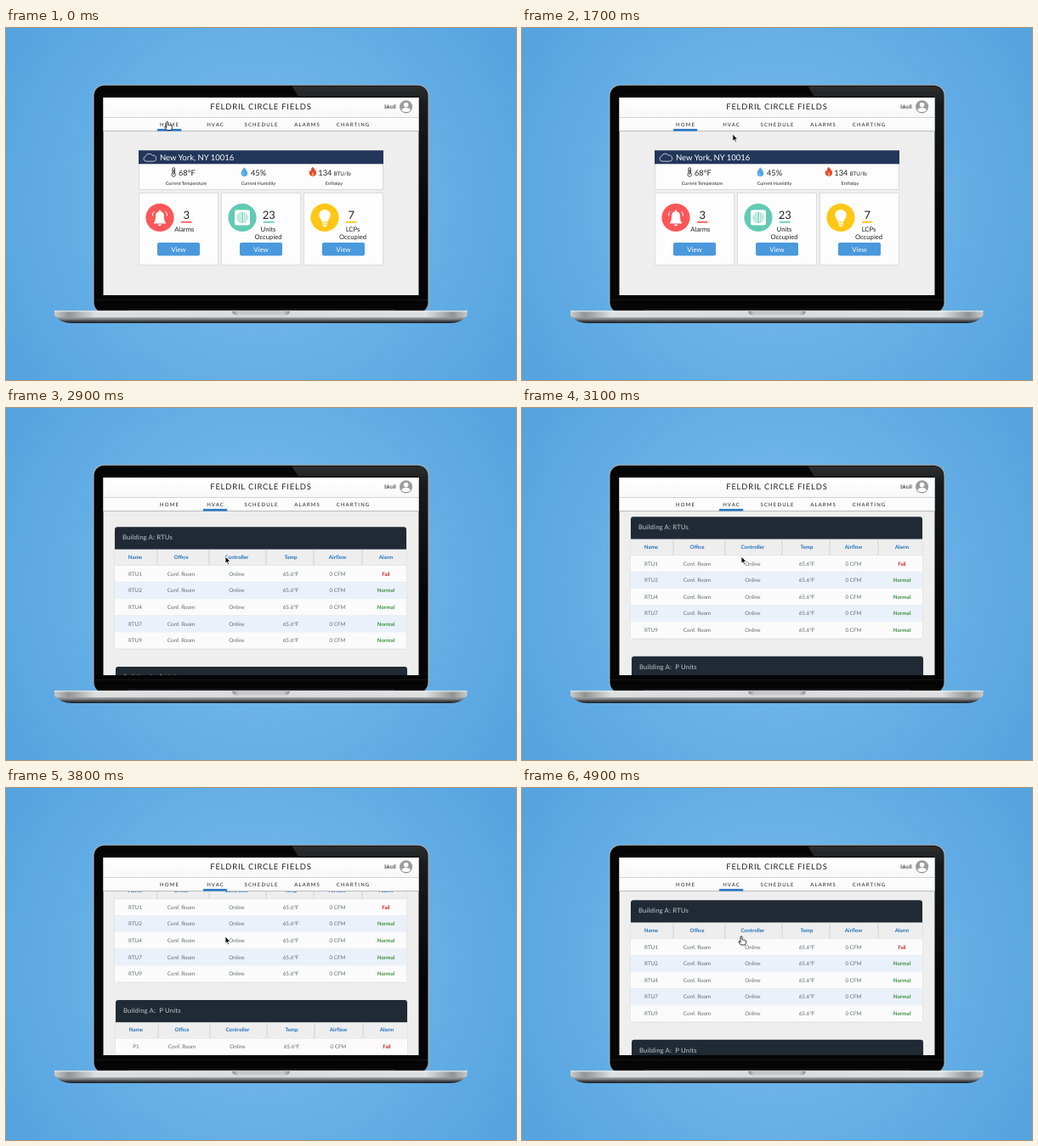
Write an HTML page that moves like this. It is 600 px wide and 415 px high and loops after 5 s.

```html
<!DOCTYPE html>
<html lang="en">
<head>
<meta charset="utf-8">
<title>Building dashboard</title>
<style>
  html, body { margin: 0; width: 100%; height: 100%; overflow: hidden; background: #5ba8e2; }
  svg { display: block; width: 600px; height: 415px; font-family: Lato, "Open Sans", sans-serif; text-rendering: geometricPrecision; }
</style>
</head>
<body>
<svg id="stage" viewBox="0 0 600 415" xmlns="http://www.w3.org/2000/svg">
  <defs>
    <radialGradient id="sky" gradientUnits="userSpaceOnUse" cx="300" cy="207" r="350">
      <stop offset="0" stop-color="#78bdee"/>
      <stop offset=".55" stop-color="#67b0e7"/>
      <stop offset="1" stop-color="#55a3df"/>
    </radialGradient>
    <linearGradient id="bar" x2="0" y2="1">
      <stop offset="0" stop-color="#fff"/>
      <stop offset="1" stop-color="#f8f8f8"/>
    </linearGradient>
    <linearGradient id="metal">
      <stop offset="0" stop-color="#c9cacc"/>
      <stop offset=".035" stop-color="#929395"/>
      <stop offset=".1" stop-color="#dedfe1"/>
      <stop offset=".5" stop-color="#d9dadc"/>
      <stop offset=".9" stop-color="#dedfe1"/>
      <stop offset=".965" stop-color="#929395"/>
      <stop offset="1" stop-color="#c9cacc"/>
    </linearGradient>
    <linearGradient id="under" x2="0" y2="1">
      <stop offset="0" stop-color="#a3a4a7"/>
      <stop offset=".35" stop-color="#85878a"/>
      <stop offset=".7" stop-color="#3c3e42"/>
      <stop offset="1" stop-color="#1d2024"/>
    </linearGradient>
    <linearGradient id="notch">
      <stop offset="0" stop-color="#8b8c8e"/>
      <stop offset=".1" stop-color="#c6c7c9"/>
      <stop offset=".9" stop-color="#c6c7c9"/>
      <stop offset="1" stop-color="#8b8c8e"/>
    </linearGradient>
    <linearGradient id="sheen" x2="0" y2="1">
      <stop offset="0" stop-color="#2d2e30"/>
      <stop offset=".08" stop-color="#1a1b1c"/>
      <stop offset=".6" stop-color="#050505"/>
    </linearGradient>
    <clipPath id="lid"><rect x="104" y="68.4" width="392" height="265" rx="11"/></clipPath>
    <clipPath id="view"><rect x="114.5" y="122" width="371" height="193"/></clipPath>
  </defs>

  <rect width="600" height="415" fill="url(#sky)"/>

  <!-- Laptop lid -->
  <rect x="102.4" y="66.7" width="395.2" height="269" rx="13" fill="#b0b2b5"/>
  <rect x="103.5" y="67.8" width="393" height="268" rx="12" fill="#050505"/>
  <path clip-path="url(#lid)" d="M336 68H497V334H485V81H344Z" fill="url(#sheen)"/>
  <rect x="104" y="320" width="392" height=".8" fill="#1c1c1e"/>
  <rect x="143" y="331.4" width="314" height="2.2" fill="#202023"/>

  <rect x="114.5" y="82" width="371" height="233" fill="#eee"/>
  <g clip-path="url(#view)">
    <g id="home"></g>
    <g id="hvac"></g>
  </g>

  <!-- Header and navigation -->
  <rect x="114.5" y="82" width="371" height="23.5" fill="url(#bar)"/>
  <rect x="114.5" y="105" width="371" height="1" fill="#d2d2d2"/>
  <rect x="114.5" y="106" width="371" height="15.5" fill="#fcfcfc"/>
  <rect x="114.5" y="121" width="371" height="1" fill="#bcbcbc"/>
  <g id="header"></g>
  <rect id="tab" y="118.9" width="28.2" height="2.6" fill="#2b78c5"/>
  <circle cx="470.6" cy="92.8" r="7.6" fill="#9b9b9b"/>
  <circle cx="470.6" cy="90.6" r="2.8" fill="#fff"/>
  <path d="M465.3 97.4Q465.8 94 470.6 94T475.9 97.4Q470.6 100.8 465.3 97.4Z" fill="#fff"/>

  <!-- Laptop base -->
  <path d="M59 340.5H540.5Q535 348 523 348H77Q65 348 59 340.5Z" fill="url(#under)"/>
  <path d="M57 333.6H542.5V338.5Q542 341.3 538 341.3H62Q57.4 341.3 57 338.5Z" fill="url(#metal)"/>
  <rect x="57" y="333.4" width="485.5" height="1" fill="#f4f5f6"/>
  <path d="M266.3 334H333.7V335Q333 338.6 328 338.6H272Q267 338.6 266.3 335Z" fill="url(#notch)"/>

  <g id="cursor">
    <path id="arrow" d="M0 0V8.3L1.9 6.6 3.2 9.6 4.6 9 3.3 6.1H5.9Z" fill="#0a0a0a" stroke="#fff" stroke-width=".8"/>
    <path id="hand" d="M-1 1Q-1-.3 0-.3T1 1V4L2 3.8 2.6 4.3 3.7 4.1 4.2 4.7 5.2 4.7 5.6 5.6V7.4L4.6 10H-.5L-2.8 7Q-3.5 5.8-2.6 5.6T-1 7Z" fill="#fff" stroke="#111" stroke-width=".85" stroke-linejoin="round"/>
  </g>
</svg>

<script>
const $ = id => document.getElementById(id);
const LOOP = 5000, STEP = 100;
const SWITCH = 1800;   // page change

const attrs = o => Object.entries(o).map(([k, v]) => `${k}="${v}"`).join(' ');
const rect = (x, y, width, height, fill, extra = {}) =>
  `<rect ${attrs({ x, y, width, height, fill, ...extra })}/>`;
const path = (d, extra) => `<path ${attrs({ d, ...extra })}/>`;
const text = (s, x, y, size, fill, extra = {}) =>
  `<text ${attrs({ x, y, 'font-size': size, fill, ...extra })}>${s}</text>`;
const mid = (s, x, y, size, fill, extra = {}) =>
  text(s, x, y, size, fill, { 'text-anchor': 'middle', ...extra });
const spaced = (s, x, y, size, gap) =>
  mid(s, x + gap / 2, y, size, '#222', { 'letter-spacing': gap });

function header() {
  const tabs = ['HOME', 'HVAC', 'SCHEDULE', 'ALARMS', 'CHARTING'];
  return spaced('FELDRIL CIRCLE FIELDS', 299.5, 96.2, 9.4, .82) +
    mid('bkoll', 452, 94.9, 6.5, '#222') +
    tabs.map((s, i) => spaced(s, 192 + 54 * i, 115.6, 6, 1.15)).join('');
}

const white = { fill: '#fff' };
const icons = {
  bell: path('M174 229.5Q176 228 176 222Q176 217 180 216.2V215Q181 214 182 215V216.2Q186 217 186 222Q186 228 188 229.5V230.5H174Z', white) +
    path('M179 231.5H183Q182.8 233.4 181 233.4T179 231.5Z', white) +
    path('M174.5 216Q172.5 218 172.3 221.5M187.5 216Q189.5 218 189.7 221.5', { fill: 'none', stroke: '#fff', 'stroke-width': 1 }),
  vent: rect(269, 214.5, 18, 18, '#fff', { rx: 2.5 }) +
    '<circle cx="278" cy="223.5" r="6.6" fill="#a9e2d6"/>' +
    path('M274 219V228M276.6 217.5V229.5M279.4 217.5V229.5M282 219V228', { stroke: '#fff', 'stroke-width': .8 }) +
    path('M278 217V230', { stroke: '#62cab4', 'stroke-width': .8 }),
  bulb: path('M371.5 228.5Q371.4 226.7 369.8 224.8A6.7 6.7 0 1 1 380.2 224.8Q378.6 226.7 378.5 228.5Z', white) +
    path('M371.8 230.1H378.2M372.1 232H377.9M373.4 233.7H376.6', { stroke: '#fff', 'stroke-width': 1.2 })
};

function card(i, color, count, lines, icon) {
  const x = 156.5 + 97 * i, c = 181 + 97 * i;
  const labelX = [209.8, 308.5, 408][i], countX = c + 31.3;
  return rect(x, 194.5, 93, 85, '#fdfdfd', { stroke: '#dadada', 'stroke-width': .9 }) +
    `<circle cx="${c}" cy="223.5" r="16.6" fill="${color}"/>` + icon +
    mid(count, countX, 225.3, 13, '#222') +
    rect(c + 25, 228, 12.5, 1.7, color) +
    lines.map((s, n) => mid(s, labelX, 239.8 + 8.8 * n, 7.7, '#222')).join('') +
    rect(c - 3, 253, 50, 15.6, '#4a99dc', { rx: 2 }) +
    mid('View', c + 22, 263.8, 7.8, '#fff');
}

function home() {
  const thermo = path('M195.9 171V166Q195.9 164.6 197.2 164.6T198.5 166V171A2.3 2.3 0 1 1 195.9 171Z', { fill: '#fff', stroke: '#333', 'stroke-width': .9 }) +
    path('M197.2 167V173', { stroke: '#333', 'stroke-width': 1 });
  const drop = path('M280.3 164.3Q284.2 169 284.2 171.2A3.7 3.7 0 0 1 276.6 171.2Q276.6 169 280.3 164.3Z', { fill: '#50a9e4' }) +
    path('M278.2 171Q278.4 173 280.3 173.2', { fill: 'none', stroke: '#b9def6', 'stroke-width': .7 });
  const flame = path('M360.5 163.8Q364 166.3 363.5 168.5L364.5 167.6Q366.4 174.6 361 174.8Q355.4 174.5 357.1 168L358.6 169Q358.6 166 360.5 163.8Z', { fill: '#e5472f' }) +
    path('M361 169.3Q363.4 173.8 361 174.2Q358.5 173.8 361 169.3Z', { fill: '#ffa63d' });
  const cloud = path('M164.5 157.2A3.1 3.1 0 0 1 164.2 151.2A4.5 4.5 0 0 1 172.2 150.2A3.5 3.5 0 0 1 173.8 157.2Z', { fill: 'none', stroke: '#e6ebf2', 'stroke-width': .8 });
  const notes = [['Current Temperature', 212], ['Current Humidity', 297], ['Enthalpy', 386]];
  return rect(156.5, 144.5, 287, 46, '#fdfdfd', { stroke: '#d8d8d8', 'stroke-width': .9 }) +
    rect(156, 144.3, 288, 16, '#22365a') + cloud +
    text('New York, NY 10016', 181, 155.8, 9.5, '#fff') +
    thermo + drop + flame +
    text('68°F', 203, 173.8, 9.2, '#222') +
    text('45%', 288, 173.8, 9.2, '#222') +
    text('134', 367.3, 173.8, 9.2, '#222') +
    text('BTU/lb', 385.6, 173.8, 6.3, '#222') +
    notes.map(([s, x]) => mid(s, x, 185, 5.3, '#222')).join('') +
    card(0, '#fb5759', '3', ['Alarms'], icons.bell) +
    card(1, '#62cab4', '23', ['Units', 'Occupied'], icons.vent) +
    card(2, '#fec715', '7', ['LCPs', 'Occupied'], icons.bulb);
}

const columns = [152, 206, 271.5, 335, 390, 447];
const dividers = [178, 239, 306, 362, 419];
const ROW = 19.6;

function table(title, prefix, x, y) {
  const bold = { 'font-weight': 700 };
  const heads = ['Name', 'Office', 'Controller', 'Temp', 'Airflow', 'Alarm'];
  const row = (n, i) => {
    const top = 45.5 + ROW * i;
    const cells = [prefix + n, 'Conf. Room', 'Online', '65.6°F', '0 CFM'];
    return rect(128, top, 343, ROW, i % 2 ? '#eaf1fa' : '#fbfbfb') +
      cells.map((s, c) => mid(s, columns[c], top + 12, 6.3, '#666b70')).join('') +
      mid(i ? 'Normal' : 'Fail', 447, top + 12, 6.2, i ? '#38913c' : '#c4282d', bold);
  };
  return `<g transform="translate(${x} ${y})">` +
    rect(127.6, 3, 343.8, 141.3, '#d8d8d8', { rx: 3 }) +
    path('M128 26.5V3Q128 0 131 0H468Q471 0 471 3V26.5Z', { fill: '#202a34' }) +
    text(title, 137, 15, 7.7, '#a9b1b8', { 'font-weight': 600, 'letter-spacing': .15 }) +
    rect(128, 26.5, 343, 19, '#eeeeef') +
    dividers.map(d => rect(d - .4, 26.5, .8, 19, '#cacaca')).join('') +
    rect(128, 45, 343, .6, '#d8d8d8') +
    heads.map((s, c) => mid(s, columns[c], 37.4, 6.2, '#2272b8', bold)).join('') +
    [1, 2, 4, 7, 9].map(row).join('') + '</g>';
}

const hvac = () =>
  text('Second Floor', 128, 147.8, 12.9, '#1d70b7') +
  table('Building A: RTUs', 'RTU', 0, 169.2) +
  table('Building A:&#160; P Units', 'P', 1, 333.8);

$('header').innerHTML = header();
$('home').innerHTML = home();
$('hvac').innerHTML = hvac();

const ease = p => p * p * (3 - 2 * p);

// Interpolates keys of the form [time, ...values].
function track(keys, t, curve = p => p) {
  const n = keys.findIndex(k => k[0] > t);
  if (n === 0) return keys[0].slice(1);
  if (n < 0) return keys[keys.length - 1].slice(1);
  const a = keys[n - 1], b = keys[n];
  const p = curve((t - a[0]) / (b[0] - a[0]));
  return a.slice(1).map((v, i) => v + (b[i + 1] - v) * p);
}

const pointer = [[200, 189.8, 110.5], [1000, 245.3, 112.7], [1500, 245.3, 112.7], [2200, 258, 175]];
const scroll = [[2500, 0], [2900, 28.9], [3400, 59.2], [3850, 87], [4050, 87], [4500, 64.6], [4900, 37], [5000, 30]];

function draw(t) {
  const onHvac = t >= SWITCH;
  const [x, y] = track(pointer, t, ease);
  const [offset] = track(scroll, t);
  const overLink = y < 119 && (x < 204 || x > 234);
  const hand = overLink || t >= 3900;
  $('home').style.display = onHvac ? 'none' : '';
  $('hvac').style.display = onHvac ? '' : 'none';
  $('hvac').setAttribute('transform', `translate(0 ${-offset})`);
  $('tab').setAttribute('x', onHvac ? 232 : 178);
  $('cursor').setAttribute('transform', `translate(${x} ${y})`);
  $('hand').style.display = hand ? '' : 'none';
  $('arrow').style.display = hand ? 'none' : '';
}

const start = performance.now();
function tick() {
  const t = (performance.now() - start) % LOOP;
  draw(Math.floor(t / STEP) * STEP);
  requestAnimationFrame(tick);
}
tick();
</script>
</body>
</html>
```
